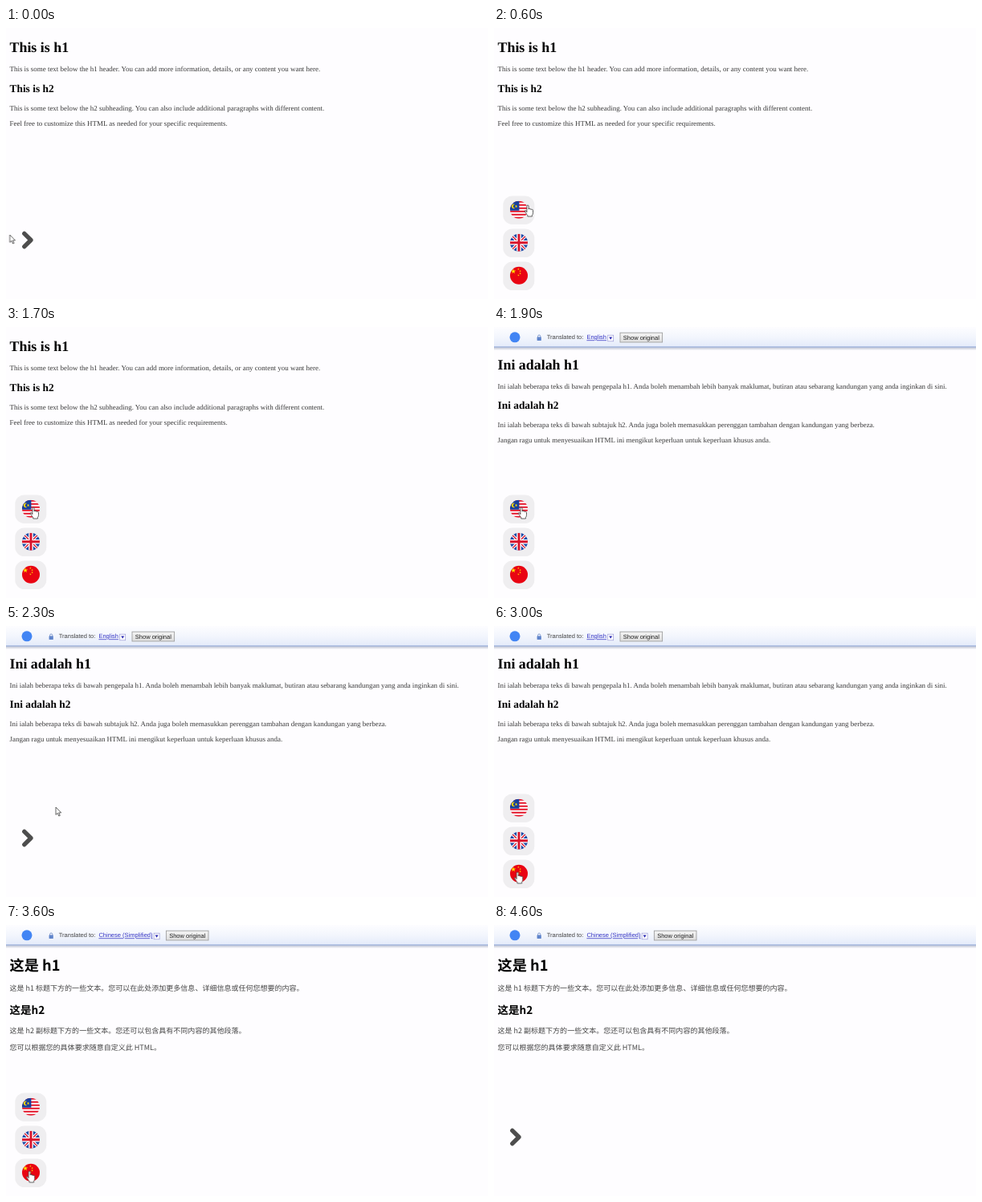
An HTML page for the animation above (4.7 s loop, 600 px wide and 338 px high).

```html
<!DOCTYPE html>
<html lang="en">
<head>
<meta charset="utf-8">
<title>Language switcher</title>
<style>
  html, body { margin: 0; width: 100%; height: 100%; overflow: hidden; background: #fefdff; }
  svg { display: block; width: 600px; height: 338px; }
  text { font: 8.95px "Liberation Serif", serif; fill: #3a3a3a; text-rendering: geometricPrecision; white-space: pre; }
  .h1, .h2 { font-weight: bold; fill: #000; }
  .h1 { font-size: 17.9px; }
  .h2 { font-size: 13.4px; }
  .zh text { font-family: "Noto Sans CJK SC", "Noto Sans CJK", sans-serif; font-size: 9.03px; fill: #444; }
  .zh .h1 { font-size: 18.2px; fill: #000; }
  .zh .h2 { font-size: 13.5px; fill: #000; }
  text.ui, .zh text.ui { font: 7.5px "Liberation Sans", Arial, sans-serif; fill: #444; }
  text.link, .zh text.link { fill: #3535c4; text-decoration: underline; }

  /* Page states: hard switches */
  .en, .ms, .zh, .bar, .open, .closed { animation: 4.7s step-end infinite; }
  .en { animation-name: en; }
  .ms { animation-name: ms; }
  .zh { animation-name: zh; }
  .bar { animation-name: bar; }
  .open { animation-name: open; }
  .closed { animation-name: closed; }
  @keyframes en { 0% { visibility: visible } 38.28%, 100% { visibility: hidden } }
  @keyframes ms { 0% { visibility: hidden } 38.28% { visibility: visible } 72.32%, 100% { visibility: hidden } }
  @keyframes zh { 0% { visibility: hidden } 72.32%, 100% { visibility: visible } }
  @keyframes bar { 0% { visibility: hidden } 38.28%, 100% { visibility: visible } }
  @keyframes open {
    0%, 46.8% { visibility: hidden }
    4.24%, 55.3% { visibility: visible }
    80.84%, 100% { visibility: hidden }
  }
  @keyframes closed {
    0%, 46.8% { visibility: visible }
    4.24%, 55.3% { visibility: hidden }
    80.84%, 100% { visibility: visible }
  }

  /* Pointer path, with rests where it hovers */
  .pointer { animation: move 4.7s linear infinite; }
  @keyframes move {
    0%, 2.13% { transform: translate(4.7px, 258px) }
    4.26% { transform: translate(20px, 261px) }
    8.51% { transform: translate(38px, 246px) }
    10.64% { transform: translate(46px, 230px) }
    12.76%, 14.89% { transform: translate(42px, 221px) }
    17.02% { transform: translate(44px, 224px) }
    21.28%, 42.55% { transform: translate(34px, 225px) }
    46.8% { transform: translate(56px, 226px) }
    48.93%, 51.06% { transform: translate(62px, 226px) }
    53.19% { transform: translate(48px, 246px) }
    55.32% { transform: translate(30px, 264px) }
    57.45% { transform: translate(28px, 280px) }
    61.7%, 78.72% { transform: translate(29.2px, 307px) }
    80.85% { transform: translate(8px, 278px) }
    82.97% { transform: translate(5px, 270px) }
    85.1%, 99.99% { transform: translate(-20px, 264px) }
    100% { transform: translate(4.7px, 258px) }
  }
</style>
</head>
<body>
<svg viewBox="0 0 600 338">
  <defs>
    <linearGradient id="sky" x2="0" y2="1">
      <stop offset="0" stop-color="#fdfdff"/>
      <stop offset=".5" stop-color="#f3f6fd"/>
      <stop offset="1" stop-color="#e4ebfa"/>
    </linearGradient>
    <linearGradient id="shade" x2="0" y2="1">
      <stop offset="0" stop-color="#8d98b0" stop-opacity=".6"/>
      <stop offset="1" stop-color="#8d98b0" stop-opacity="0"/>
    </linearGradient>
    <linearGradient id="grey" x2="0" y2="1">
      <stop offset="0" stop-color="#f4f4f4"/>
      <stop offset="1" stop-color="#dedede"/>
    </linearGradient>
    <clipPath id="disc"><circle r="11"/></clipPath>
    <rect id="pill" x="-19.7" y="-17.2" width="39" height="35.4" rx="11.5" fill="#efeef0"/>
    <path id="star" d="M0-1 .225-.309H.951L.363.118.588.809 0 .382-.588.809-.363.118-.951-.309H-.225Z" fill="#ffe000"/>
    <g id="controls">
      <rect x="141.7" y="10.2" width="7" height="7.6" fill="#fff" stroke="#9a9ad6" stroke-width=".7"/>
      <path d="M143.2 12.6h4l-2 3.2Z" fill="#2c2cb4"/>
      <rect x="157" y="7.2" width="52.6" height="11.8" fill="url(#grey)" stroke="#a0a0a0" stroke-width=".9"/>
      <text class="ui" x="160.8" y="15.6" style="fill:#222">Show original</text>
    </g>
  </defs>

  <g class="bar">
    <rect y="25.2" width="600" height="4" fill="url(#shade)"/>
    <rect width="600" height="24.6" fill="url(#sky)"/>
    <rect y="24.4" width="600" height="1" fill="#86a1d4"/>
    <circle cx="26" cy="12.8" r="6.5" fill="#4285f4"/>
    <path d="M54.6 13v-1.4a1.6 1.6 0 0 1 3.2 0V13" fill="none" stroke="#7d98cc" stroke-width="1"/>
    <rect x="53.6" y="12.6" width="5.2" height="4.4" rx=".6" fill="#5f84cb"/>
    <text class="ui" x="65.8" y="15.4">Translated to:</text>
  </g>

  <g class="en">
    <text class="h1" x="4.5" y="30.2">This is h1</text>
    <text x="4.5" y="54.2">This is some text below the h1 header. You can add more information, details, or any content you want here.</text>
    <text class="h2" x="4.5" y="80">This is h2</text>
    <text x="4.5" y="102.9">This is some text below the h2 subheading. You can also include additional paragraphs with different content.</text>
    <text x="4.5" y="122">Feel free to customize this HTML as needed for your specific requirements.</text>
  </g>

  <g class="ms" lang="ms">
    <text class="ui link" x="115.4" y="15.4">English</text>
    <use href="#controls"/>
    <text class="h1" x="4.5" y="52.9">Ini adalah h1</text>
    <text x="4.5" y="76.9">Ini ialah beberapa teks di bawah pengepala h1. Anda boleh menambah lebih banyak maklumat, butiran atau sebarang kandungan yang anda inginkan di sini.</text>
    <text class="h2" x="4.5" y="102.4">Ini adalah h2</text>
    <text x="4.5" y="125.2">Ini ialah beberapa teks di bawah subtajuk h2. Anda juga boleh memasukkan perenggan tambahan dengan kandungan yang berbeza.</text>
    <text x="4.5" y="144.3">Jangan ragu untuk menyesuaikan HTML ini mengikut keperluan untuk keperluan khusus anda.</text>
  </g>

  <g class="zh" lang="zh-CN">
    <text class="ui link" x="115.4" y="15.4" lang="en">Chinese (Simplified)</text>
    <use href="#controls" x="42.4"/>
    <text class="h1" x="4.5" y="56.6">这是 h1</text>
    <text x="4.5" y="82.2">这是 h1 标题下方的一些文本。您可以在此处添加更多信息、详细信息或任何您想要的内容。</text>
    <text class="h2" x="4.5" y="110.6">这是h2</text>
    <text x="4.5" y="134.6">这是 h2 副标题下方的一些文本。您还可以包含具有不同内容的其他段落。</text>
    <text x="4.5" y="155.5">您可以根据您的具体要求随意自定义此 HTML。</text>
  </g>

  <path class="closed" d="M22.8 256.4 31 264.5 22.8 272.6" fill="none" stroke="#4d4d4d" stroke-width="5.3" stroke-linecap="round" stroke-linejoin="round"/>

  <g class="open">
    <g transform="translate(31 226.7)">
      <use href="#pill"/>
      <g clip-path="url(#disc)">
        <rect x="-11" y="-11" width="22" height="22" fill="#fff"/>
        <path d="M-11-10h22M-11-6h22M-11-2h22M-11 2h22M-11 6h22M-11 10h22" stroke="#e3162b" stroke-width="2"/>
        <path d="M-11-11H.4V1H-11Z" fill="#173f9c"/>
        <path d="M-4.8-6.6a2.8 2.8 0 1 0 0 4.6a2.3 2.3 0 1 1 0-4.6Z" fill="#ffd500"/>
        <use href="#star" transform="translate(-3.4 -4.3) scale(1.9)"/>
      </g>
    </g>
    <g transform="translate(31 267.8)">
      <use href="#pill"/>
      <g clip-path="url(#disc)" fill="none">
        <rect x="-11" y="-11" width="22" height="22" fill="#1c4aa6"/>
        <path d="M-11-11 11 11M11-11-11 11" stroke="#fff" stroke-width="3.6"/>
        <path d="M-11-11 11 11M11-11-11 11" stroke="#d8142c" stroke-width="1.3"/>
        <path d="M0-11V11M-11 0H11" stroke="#fff" stroke-width="5.6"/>
        <path d="M0-11V11M-11 0H11" stroke="#d8142c" stroke-width="2.9"/>
      </g>
    </g>
    <g transform="translate(31 308.8)">
      <use href="#pill"/>
      <circle r="11" fill="#e90412"/>
      <use href="#star" transform="translate(-6.9 -5.2) scale(3.3)"/>
      <use href="#star" transform="translate(-.6 -8) rotate(20) scale(1.3)"/>
      <use href="#star" transform="translate(1.6 -5.6) rotate(40) scale(1.3)"/>
      <use href="#star" transform="translate(1.6 -2.6) scale(1.3)"/>
      <use href="#star" transform="translate(-.6 -.4) rotate(20) scale(1.3)"/>
    </g>
  </g>

  <g class="pointer" fill="#fff" stroke="#333" stroke-width=".75" stroke-linejoin="round">
    <path class="closed" d="M0 0V9.4L2.2 7.4 3.8 11 5.3 10.4 3.7 6.9H6.7Z"/>
    <path class="open" d="M-1.1 8.6V1.1a1.1 1.1 0 0 1 2.2 0V5a1 1 0 0 1 2 .3a1 1 0 0 1 1.8.4a.9.9 0 0 1 1.6.6V9.6Q6.5 11.4 5.4 12.4V14H-.2V12.6Q-1.4 11.4-2.2 9.8L-3.6 7.8Q-4 6.7-3 6.5Q-2.2 6.6-1.1 8.6Z"/>
  </g>
</svg>
</body>
</html>
```
